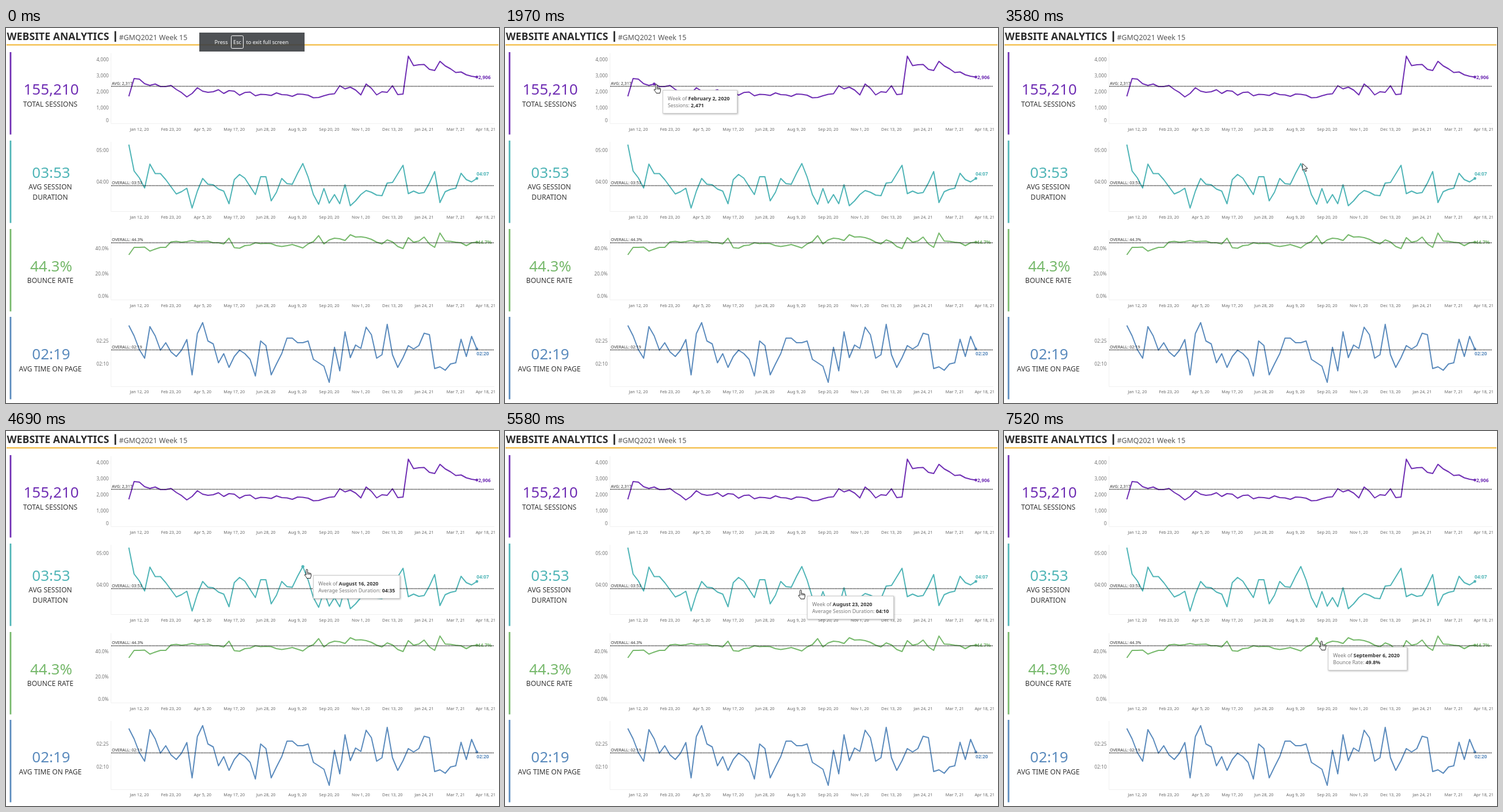
These frames come from a looping animation (857x653 px, 8000 ms). An HTML page:

```html
<!DOCTYPE html>
<html lang="en">
<head>
<meta charset="utf-8">
<title>Website analytics</title>
<style>
  html, body { margin: 0; width: 100%; height: 100%; overflow: hidden; background: #fff; }
  body, text { font-family: "Noto Sans", "Open Sans", sans-serif; }
  svg { position: absolute; left: 0; top: 0; }
  #tip {
    position: absolute; left: 0; top: 0; padding: 8px 8px 7px; white-space: nowrap;
    font-size: 8.8px; line-height: 12px; color: #777;
    background: #fff; border: 1px solid #ccc; box-shadow: 1px 1px 3px rgba(0,0,0,.3);
  }
  #tip b { font-weight: 600; color: #333; }
</style>
</head>
<body>
<svg id="board" width="857" height="653" viewBox="0 0 857 653"></svg>
<div id="tip"></div>
<svg width="857" height="653" viewBox="0 0 857 653">
  <path id="cursor" fill="#fff" stroke="#222" stroke-linejoin="round"/>
</svg>
<script>
const LOOP = 8000;
const weekX = i => 213.5 + 9.167 * i;

// Weekly heights in stage pixels
const sessions = [119, 88, 89, 97, 100, 97.5, 102, 102, 100, 107, 112.4, 120, 114, 104, 110, 112, 111,
  107.5, 114, 109, 110, 117, 112.3, 111.5, 118, 115.5, 116, 117.5, 113, 116, 116.5, 119, 115, 115.5,
  117, 121.5, 121, 118, 115.5, 114.5, 100.5, 106, 103, 108, 116.5, 97.5, 105, 116.5, 111, 112, 100.5,
  116, 115, 49, 65.5, 64, 63.5, 72, 74, 58, 66, 71, 77.5, 76.5, 81.5, 84, 85.4];
const duration = [203, 249, 261, 278.5, 237, 253.5, 253.5, 264, 276.5, 289, 285, 279, 313.5, 284, 262,
  272, 273, 280.5, 284, 306, 264, 255, 261.5, 276, 290, 259, 259, 301, 286, 262, 271, 272, 253, 236,
  259.5, 290, 307, 279.5, 305, 290, 306, 273, 309.5, 301, 290, 283, 286, 291, 292, 270, 269, 254, 239,
  288.5, 284, 288, 286.5, 270, 250, 304, 285, 281, 279, 253, 264, 268, 262];
const bounce = [395, 382, 382, 381.5, 388.5, 385, 382, 382, 372.5, 371.5, 373, 372, 370, 372, 371.5,
  371, 374, 374, 376, 366, 382.5, 383.5, 379, 378, 374, 375.5, 375, 375.5, 379, 380.5, 379, 377, 380,
  383, 376, 372, 361.5, 376, 369, 366, 367, 370, 360, 364, 363.5, 365, 368, 373, 376, 369, 372.5,
  380.5, 384, 365, 373, 371, 364, 376, 382, 357, 371, 371.5, 373, 374, 379, 374, 373];
const pageTime = [518, 536, 560, 575, 520, 536, 561, 548, 564, 572, 561, 542.5, 604, 532, 513, 545, 550,
  583, 567, 591, 572, 561, 567, 577, 606, 545, 553, 604, 585, 567, 540, 540, 548, 548, 545, 577, 583,
  589, 617, 556, 597, 529, 574, 552, 558, 521, 534, 575, 569, 516, 569, 591, 574, 553, 559, 553, 531.5,
  534, 593, 590, 596, 585, 583, 542, 572, 537, 559];

const charts = [
  { color: '#702fb4', data: sessions, top: 42, bottom: 166.5, total: '155,210', totalY: 116.3,
    name: ['TOTAL SESSIONS'], mean: 'AVG: 2,317', meanY: 101.5, last: '2,906', lastX: 821, lastY: 89, datesY: 179.3,
    ticks: { '4,000': 54.5, '3,000': 82.5, '2,000': 110.5, '1,000': 138.5, '0': 160.5 } },
  { color: '#50b5b7', data: duration, top: 196, bottom: 319.5, total: '03:53', totalY: 261,
    name: ['AVG SESSION', 'DURATION'], mean: 'OVERALL: 03:53', meanY: 274.5, last: '04:07', lastX: 818, lastY: 256.5, datesY: 332.3,
    ticks: { '05:00': 212.5, '04:00': 267.5 } },
  { color: '#77b96c', data: bounce, top: 350, bottom: 473.5, total: '44.3%', totalY: 424,
    name: ['BOUNCE RATE'], mean: 'OVERALL: 44.3%', meanY: 374, last: '44.7%', lastX: 820, lastY: 376, datesY: 485.7,
    ticks: { '40.0%': 383.5, '20.0%': 428, '0.0%': 467 } },
  { color: '#5b8bbd', data: pageTime, top: 503, bottom: 624.5, total: '02:19', totalY: 577.3,
    name: ['AVG TIME ON PAGE'], mean: 'OVERALL: 02:19', meanY: 560.5, last: '02:20', lastX: 818, lastY: 570, datesY: 636.3,
    ticks: { '02:25': 545, '02:10': 584.5 } },
];
const dates = ['Jan 12, 20', 'Feb 23, 20', 'Apr 5, 20', 'May 17, 20', 'Jun 28, 20', 'Aug 9, 20',
  'Sep 20, 20', 'Nov 1, 20', 'Dec 13, 20', 'Jan 24, 21', 'Mar 7, 21', 'Apr 18, 21'];

const text = (x, y, size, fill, str, { anchor = 'start', weight = 400 } = {}) =>
  `<text x="${x}" y="${y}" font-size="${size}" fill="${fill}" text-anchor="${anchor}" font-weight="${weight}">${str}</text>`;
const rect = (x, y, w, h, fill, more = '') =>
  `<rect x="${x}" y="${y}" width="${w}" height="${h}" fill="${fill}" ${more}/>`;
const mid = weight => ({ anchor: 'middle', weight });

function chartMarkup(c) {
  const points = c.data.map((y, i) => `${weekX(i)},${y}`).join(' ');
  return rect(6.5, c.top, 2.8, 143.5, c.color)
    + text(78.5, c.totalY, 26, c.color, c.total, mid(500))
    + c.name.map((line, i) => text(77, c.totalY + 20.2 + 18 * i, 12.05, '#333', line, mid(500))).join('')
    + `<path d="M182.5 ${c.top + 2}V${c.bottom}H849" fill="none" stroke="#f0f0f0"/>`
    + Object.entries(c.ticks).map(([label, y]) => text(178.5, y + 3, 8.3, '#757575', label, { anchor: 'end' })).join('')
    + dates.map((d, i) => text(Math.min(231.8 + 55 * i, 833.7), c.datesY, 7.3, '#666', d, mid(400))).join('')
    + `<polyline points="${points}" fill="none" stroke="${c.color}" stroke-width="2" stroke-linejoin="round"/>`
    + `<circle cx="${weekX(66)}" cy="${c.data[66]}" r="2.4" fill="${c.color}"/>`
    + text(c.lastX, c.lastY, 8.4, c.color, c.last, { weight: 600 })
    + `<path d="M183 ${c.meanY}H848" stroke="#111" stroke-width="1.5" stroke-dasharray="1.4 1.2"/>`
    + text(184, c.meanY - 3, 7.2, '#333', c.mean);
}

const $ = id => document.getElementById(id);
$('board').innerHTML =
  text(1.5, 21, 17.7, '#2b2b2b', 'WEBSITE ANALYTICS', { weight: 600 })
  + rect(188.7, 5.5, 2.7, 18.5, '#222')
  + text(196.5, 21, 12.4, '#555', '#GMQ2021 Week 15')
  + rect(1, 28, 855, 2.7, '#f4c55e')
  + charts.map(chartMarkup).join('')
  + '<circle id="dot" r="2.6"/>'
  + '<g id="notice">' + rect(336, 8, 183, 33, '#3c4043', 'opacity=".9"')
  + rect(391.5, 13.5, 21, 22, 'none', 'rx="2" stroke="#fff"')
  + text(362.5, 27.8, 9.2, '#fff', 'Press') + text(402, 27.8, 9.2, '#fff', 'Esc', mid(400))
  + text(417.5, 27.8, 9.2, '#fff', 'to exit full screen') + '</g>';

const week = (date, label, value) => `Week of <b>${date}</b>&nbsp;&nbsp;<br>${label}: <b>${value}</b>`;
const hovers = [
  { from: 740, to: 870, html: week('March 8, 2020', 'Sessions', '1,940'), chart: 0, week: 10 },
  { from: 980, to: 2040, html: week('February 2, 2020', 'Sessions', '2,471'), chart: 0, week: 5 },
  { from: 2560, to: 3080, html: 'AVERAGE WEEKLY SESSIONS: 2,317' },
  { from: 3600, to: 4750, html: week('August 16, 2020', 'Average Session Duration', '04:35'), chart: 1, week: 33 },
  { from: 4750, to: 5500, html: week('August 23, 2020', 'Average Session Duration', '04:10'), chart: 1, week: 34 },
  { from: 5500, to: 5940, html: week('August 23, 2020', 'Average Session Duration', '04:10') },
  { from: 5940, to: 6900, html: 'OVERALL AVERAGE SESSION DURATION: 03:53' },
  { from: 7400, to: LOOP, html: week('September 6, 2020', 'Bounce Rate', '49.8%'), chart: 2, week: 36 },
];

// Pointer path: time, x, y
const route = [[390, 857, 312], [560, 589, 219], [760, 301, 113], [800, 295, 111], [850, 295, 111],
  [1130, 263, 98], [2000, 263, 98], [2200, 330, 90], [2380, 403, 101], [2560, 403, 101], [2710, 402, 99],
  [3070, 402, 99], [3600, 523, 241], [4740, 523, 241], [4970, 522, 269], [5380, 522, 269],
  [5530, 514, 277], [6860, 514, 277], [7440, 552, 366], [LOOP, 552, 366]];
function pointer(t) {
  const i = Math.max(1, route.findIndex(p => p[0] >= t));
  const [t0, x0, y0] = route[i - 1], [t1, x1, y1] = route[i];
  const k = Math.max(0, (t - t0) / (t1 - t0));
  return [x0 + (x1 - x0) * k, y0 + (y1 - y0) * k];
}

const HAND = 'M-1.3 9V1.2a1.3 1.3 0 0 1 2.6 0V6q1.2-.8 2.2.3q1.2-.6 2 .5q1.6-.5 1.9 1V11q0 2-1 3.2V15.5H0'
  + 'q-.6-2-2.5-3.8q-2-2-1.2-2.7q1-.6 2.4.9zM1.3 6v3M3.5 6.3v3M5.5 6.8v2.5';
const ARROW = 'M0 0V12L3 9.3L5 14L7 13L5 8.7H9z';
const show = (el, on) => { el.style.visibility = on ? 'visible' : 'hidden'; };
let shown;

function render(t) {
  const hover = hovers.find(h => t >= h.from && t < h.to);
  const [x, y] = pointer(t).map(Math.round);
  const [tipX, tipY] = pointer(t - 40).map(Math.round);

  $('notice').setAttribute('opacity', Math.min(1, Math.max(0, (1030 - t) / 640)));

  show($('cursor'), t >= 390);
  $('cursor').setAttribute('d', hover ? HAND : ARROW);
  $('cursor').setAttribute('transform', `translate(${x} ${y})`);

  show($('tip'), hover);
  if (hover && hover.html !== shown) $('tip').innerHTML = shown = hover.html;
  $('tip').style.transform = `translate(${tipX + 11}px, ${tipY + 10}px)`;

  const marked = hover && hover.week !== undefined;
  show($('dot'), marked);
  if (marked) {
    const c = charts[hover.chart];
    $('dot').setAttribute('cx', weekX(hover.week));
    $('dot').setAttribute('cy', c.data[hover.week]);
    $('dot').setAttribute('fill', c.color);
  }
}

const start = performance.now();
function tick() {
  render((performance.now() - start) % LOOP);
  requestAnimationFrame(tick);
}
tick();
</script>
</body>
</html>
```
